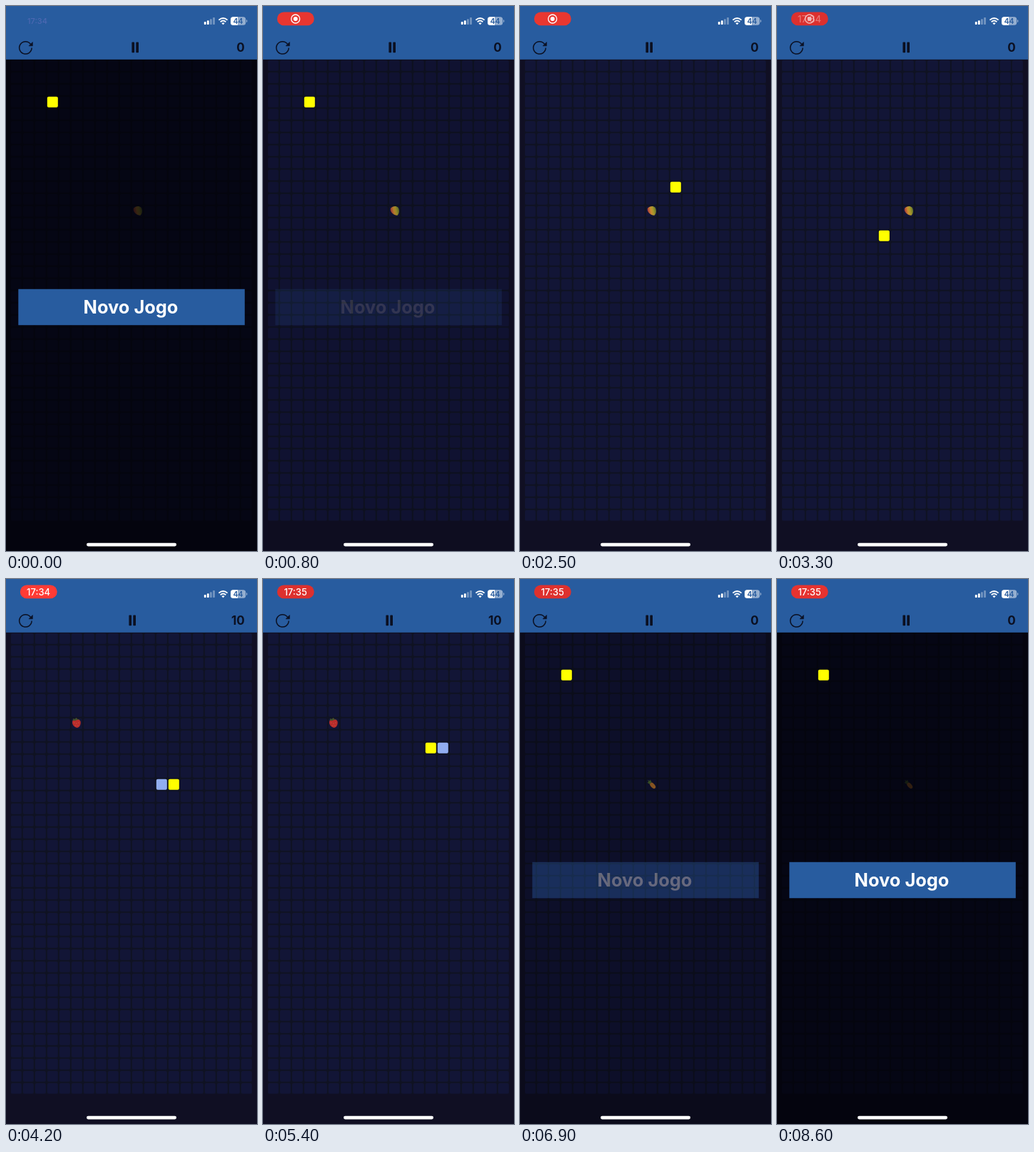
Animation, 352 px wide and 762 px high, one loop 8700 ms. Source, as an HTML page:

```html
<!DOCTYPE html>
<html lang="pt">
<head>
<meta charset="utf-8">
<title>Jogo</title>
<style>
html, body { margin: 0; width: 100%; height: 100%; overflow: hidden; background: #100f23; }
svg { display: block; width: 100vw; height: 100vh; }
text { font-family: Inter, Roboto, sans-serif; }
</style>
</head>
<body>
<svg viewBox="0 0 352 762">
  <defs>
    <pattern id="cells" x="6.8" y="75.8" width="17" height="17" patternUnits="userSpaceOnUse">
      <rect width="17" height="17" fill="#0f1222"/>
      <rect width="15" height="15" rx="2.5" fill="#121536"/>
    </pattern>
    <linearGradient id="mangoSkin" x1="0" y1=".6" x2="1" y2=".4">
      <stop offset=".05" stop-color="#a8383a"/>
      <stop offset=".4" stop-color="#c98a30"/>
      <stop offset=".65" stop-color="#a8982c"/>
      <stop offset="1" stop-color="#5f7428"/>
    </linearGradient>
  </defs>

  <rect width="352" height="762" fill="#100f23"/>
  <rect x="6.8" y="75.8" width="338.2" height="644" fill="url(#cells)"/>

  <g id="mango" transform="translate(184.8 286)">
    <path d="M-5.5-3.5C-3-6.5 2-7 4.5-4.5C7-1 6.5 3.5 4 6.5C1 7.5-3 5-5 2C-6.3 0-6.5-2-5.5-3.5Z" fill="url(#mangoSkin)"/>
  </g>
  <g id="strawberry" transform="translate(98.5 201)">
    <path d="M-5-3C-3-6 4-6 6-2C7 3 4 7 1 7C-3 6-7 2-5-3Z" fill="#b82c2b"/>
    <path d="M-5-3L-4-6L-2-5L0-7L2-5L5-4L1-4L-1-3L-3-3Z" fill="#46502a"/>
    <path d="M-3 0h.8M0 1h.8M3 0h.8M-1 4h.8M2 4h.8" stroke="#d8835c" stroke-width=".8"/>
  </g>
  <g id="carrot" transform="translate(184.5 287) rotate(-42)">
    <ellipse cy="2.5" rx="2.8" ry="5" fill="#b5722b"/>
    <path d="M-2-2L-3-6L-1-5L0-8L1-5L3-6L2-2Z" fill="#4d6a30"/>
  </g>

  <g id="overlay">
    <rect y="74" width="352" height="688" fill="#000008" opacity=".73"/>
    <rect x="17.3" y="395.8" width="317.5" height="50.4" fill="#285c9f"/>
    <text x="175" y="430.3" text-anchor="middle" font-size="25.4" font-weight="700" fill="#fff">Novo Jogo</text>
  </g>

  <rect id="body" width="15" height="15" rx="2" fill="#91adf0"/>
  <rect id="head" width="15" height="15" rx="2" fill="#ff0"/>

  <rect width="352" height="74.8" fill="#285c9f"/>

  <g fill="none" stroke="#0b1022" stroke-width="1.5">
    <path d="M34.4 53.2A8.7 8.7 0 1 0 36.1 58.6"/>
    <path d="M37.3 50.5V55.8H32Z" fill="#0b1022" stroke-width=".6"/>
  </g>
  <g id="pause" fill="#0b1022">
    <rect x="176.4" y="50.6" width="3.7" height="14.6" rx=".8"/>
    <rect x="182.3" y="50.6" width="3.7" height="14.6" rx=".8"/>
  </g>
  <text id="score" x="334.7" y="64.2" text-anchor="end" font-size="17" font-weight="700" fill="#0b1022"></text>

  <text id="clock" x="44" y="25" text-anchor="middle" font-size="11" font-weight="500" fill="#4d68b2">17:34</text>
  <g id="pill">
    <rect id="pillBack" x="19.8" y="8.5" width="51.9" height="18.8" rx="9.4"/>
    <g id="record">
      <circle cx="45.6" cy="18" r="6" fill="none" stroke="#fff" stroke-width="1.3"/>
      <circle cx="45.6" cy="18" r="3" fill="#fff"/>
    </g>
    <text id="time" x="45.6" y="22.7" text-anchor="middle" font-size="13" font-weight="500" fill="#fff"></text>
  </g>

  <g fill="#fff">
    <rect x="277.8" y="22" width="2.8" height="4" rx=".8"/>
    <rect x="281.9" y="20.2" width="2.8" height="5.8" rx=".8"/>
    <g opacity=".35">
      <rect x="286" y="18.2" width="2.8" height="7.8" rx=".8"/>
      <rect x="290.1" y="16" width="2.8" height="10" rx=".8"/>
    </g>
    <path d="M304.5 26.3L302.3 24Q304.5 22.3 306.7 24Z"/>
    <g fill="none" stroke="#fff" stroke-width="1.9">
      <path d="M298.4 19.6Q304.5 14.2 310.6 19.6"/>
      <path d="M300.7 22.2Q304.5 19 308.3 22.2"/>
    </g>
    <rect x="315" y="15.2" width="21.2" height="11.6" rx="3.6" opacity=".5"/>
    <path d="M325 15.2h-6.4a3.6 3.6 0 0 0-3.6 3.6v4.4a3.6 3.6 0 0 0 3.6 3.6H325Z"/>
    <path d="M337 19v4q1.4-.5 1.4-2t-1.4-2Z" opacity=".5"/>
  </g>
  <text x="325.4" y="24.8" text-anchor="middle" font-size="10.5" font-weight="600" fill="#285c9f">44</text>

  <rect x="113" y="750.8" width="126" height="4.6" rx="2.3" fill="#fff"/>
</svg>
<script>
const LOOP = 8700, TICK = 98, START = 880;
const PITCH = 17, LEFT = 6.8, TOP = 75.8;
const ROUTE = 'R9 D11 L5 U2 R11 U3 L18';
const FOOD = [10, 12];
const STEP = { R: [1, 0], L: [-1, 0], U: [0, -1], D: [0, 1] };
const PILL = [ // time, red, green, blue
  [0, 232, 54, 48], [2500, 233, 55, 48], [3300, 220, 48, 46], [4200, 255, 59, 53],
  [5400, 221, 48, 46], [6700, 218, 48, 45], [7800, 240, 54, 50], [8300, 240, 54, 50],
  [8700, 226, 50, 47]
];

const $ = id => document.getElementById(id);
const ramp = (t, from, to) => Math.max(0, Math.min(1, (t - from) / (to - from)));
const ease = v => v * v * (3 - 2 * v);
const show = (id, opacity) => $(id).setAttribute('opacity', +opacity);

const trail = [{ head: [3, 3], tail: [2, 3] }];
for (const leg of ROUTE.split(' ')) {
  const [dx, dy] = STEP[leg[0]];
  for (let n = +leg.slice(1); n > 0; n--) {
    const { head } = trail[trail.length - 1];
    trail.push({ head: [head[0] + dx, head[1] + dy], tail: head });
  }
}
const timeOf = index => START + index * TICK;
const EAT = timeOf(trail.findIndex(({ head }) => head[0] === FOOD[0] && head[1] === FOOD[1]));
const CRASH = timeOf(trail.length);

function place(id, [col, row]) {
  $(id).setAttribute('x', LEFT + PITCH * col);
  $(id).setAttribute('y', TOP + PITCH * row);
}

function pillColor(t) {
  const i = PILL.findIndex(k => k[0] > t);
  const a = PILL[i - 1], b = PILL[i], f = (t - a[0]) / (b[0] - a[0]);
  return `rgb(${[1, 2, 3].map(c => Math.round(a[c] + (b[c] - a[c]) * f))})`;
}

function render(t) {
  const over = t >= CRASH, grown = t >= EAT && !over;
  const index = over ? 0 : Math.max(0, Math.floor((t - START) / TICK));
  const pose = trail[index];
  place('head', pose.head);
  place('body', pose.tail);
  show('body', grown);
  show('mango', t < EAT);
  show('strawberry', grown);
  show('carrot', over);
  show('overlay', over ? ease(ramp(t, CRASH, CRASH + 350)) : 1 - ease(ramp(t, 540, 880)));

  $('score').textContent = grown ? '10' : '0';
  $('pause').setAttribute('transform', `translate(${grown ? -4 : 0} 0)`);

  const pill = ramp(t, 50, 400), timed = ramp(t, 3200, 3500);
  show('clock', 1 - pill);
  show('pill', pill);
  show('record', 1 - timed);
  show('time', timed);
  $('time').textContent = t < 4800 ? '17:34' : '17:35';
  $('pillBack').setAttribute('fill', pillColor(t));
}

const begin = performance.now();
function frame() {
  render((performance.now() - begin) % LOOP);
  requestAnimationFrame(frame);
}
frame();
</script>
</body>
</html>
```
